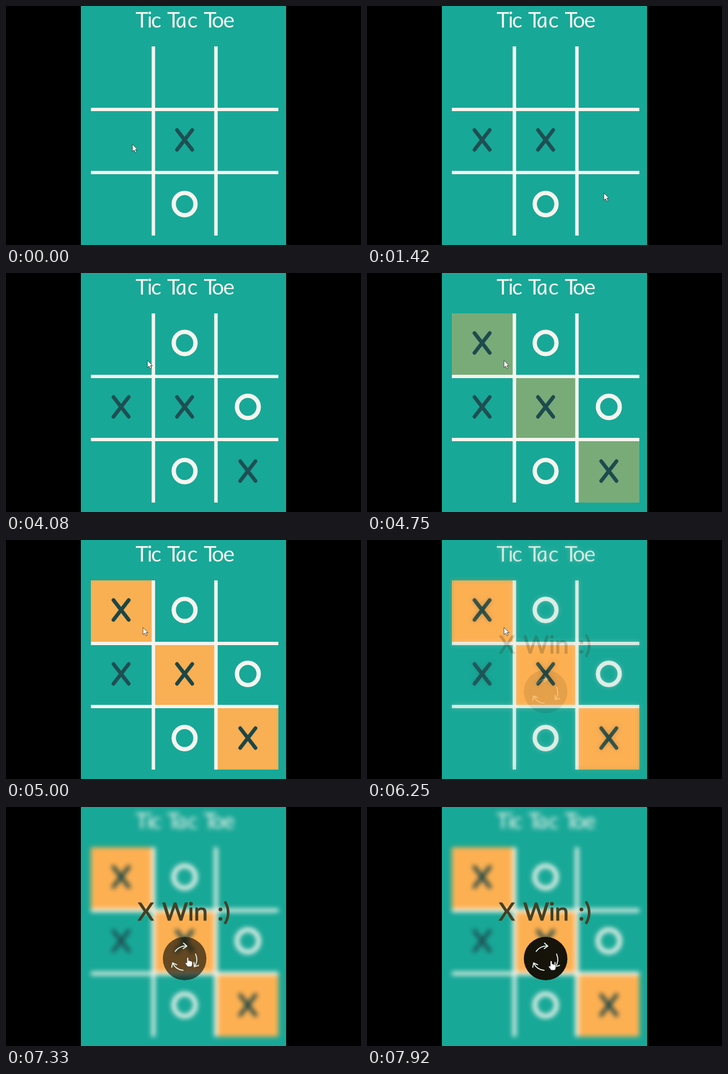
An HTML page for the animation above (8000 ms loop, 640 by 432 pixels).

```html
<!DOCTYPE html>
<html lang="en">
<head>
<meta charset="utf-8">
<title>Tic Tac Toe</title>
<style>
  html, body { margin: 0; width: 100%; height: 100%; overflow: hidden; background: #000; }
  svg { display: block; width: 640px; height: 432px; }
  text { font-family: Lato, sans-serif; }
  .title { font-size: 39px; fill: #f5f5ee; }
  .slant { font-style: italic; }
  .result { font-size: 45px; fill: #453f24; stroke: #453f24; stroke-width: 1.2; stroke-linejoin: round; }
  .x { fill: none; stroke: #1e4f53; stroke-width: 6.8; stroke-linecap: round; }
  .o { fill: none; stroke: #f5f5ee; stroke-width: 7.8; }
  .win { fill: #fdb052; }
  .icon { fill: none; stroke: #e6f3ea; stroke-width: 1.8; stroke-linecap: round; stroke-linejoin: round; }
  .arrow, .hand { fill: #fff; stroke: #2b2b2b; stroke-width: .8; stroke-linejoin: round; }
  .beam { fill: none; stroke: #35524f; stroke-width: 1.2; }
  #blurred { filter: blur(4px); }
</style>
</head>
<body>
<svg viewBox="0 0 640 432">
  <defs>
    <path id="cross" d="M-13.7-17.8 13.7 17.8M13.7-17.8-13.7 17.8"/>
    <ellipse id="ring" rx="19.6" ry="20.1"/>
    <path id="turn" d="M-17-13Q-9-24 4-22.5M-2-28 4-22.5-2.5-18"/>
    <clipPath id="panel"><rect x="135" width="370" height="432"/></clipPath>
  </defs>
  <g clip-path="url(#panel)">
    <g id="board">
      <rect x="115" y="-20" width="410" height="472" fill="#18a897"/>
      <g class="title">
        <text y="39" x="233.5 254.5 261.5">Tic</text>
        <text y="39" x="290.5">T</text>
        <text class="slant" transform="translate(307.5 39) skewX(8)">a</text>
        <text y="39" x="327">c</text>
        <text y="39" x="356.5 371 391.5">Toe</text>
      </g>
      <g id="cells"></g>
      <path d="M265.7 73V415M378.5 73V415M153 187H491M153 301H491" stroke="#f5f5ee" stroke-width="6.2"/>
      <g id="marks"></g>
    </g>
    <g id="modal">
      <use id="blurred" href="#board"/>
      <g class="result">
        <text x="237.5" y="205">X</text>
        <text x="281.5" y="205">Win</text>
        <text x="381" y="205">:)</text>
      </g>
      <circle id="disc" cx="322" cy="274" r="39.3" fill="#15130a"/>
      <g class="icon" transform="translate(322 274)">
        <use href="#turn"/>
        <use href="#turn" transform="rotate(120)"/>
        <use href="#turn" transform="rotate(240)"/>
      </g>
    </g>
  </g>
  <g id="cursor">
    <path class="arrow" d="M0 0V13L3 10.3 5.2 15 7.4 14 5.2 9.5H9Z"/>
    <path class="beam" d="M-3-6.5H-1Q0-6.5 0-5.5Q0-6.5 1-6.5H3M0-5.5V5.5M-3 6.5H-1Q0 6.5 0 5.5Q0 6.5 1 6.5H3"/>
    <path class="hand" d="M-1.5 1Q0-1 1.5 1V6Q3 5 4 6.5Q5.5 5.6 6.5 7.2Q8.5 7 8.5 9V12Q8 15 6.5 17H0L-4.5 11Q-4.5 8.5-1.5 10Z"/>
  </g>
</svg>
<script>
const LOOP = 8000;
const $ = id => document.getElementById(id);
const clamp = v => Math.min(1, Math.max(0, v));
const span = (t, from, to) => clamp((t - from) / (to - from));
const smooth = p => p * p * (3 - 2 * p);
const easeOut = p => 1 - (1 - p) ** 2.5;

function add(parent, tag, attrs) {
  const el = document.createElementNS("http://www.w3.org/2000/svg", tag);
  for (const key in attrs) el.setAttribute(key, attrs[key]);
  return parent.appendChild(el);
}

const colX = [207.5, 322, 436], rowY = [126.4, 242, 358];
// kind, column, row, time placed, part of the winning line
const moves = [
  ["x", 1, 1, 0, true], ["o", 1, 2, 0],
  ["x", 0, 1, 500], ["o", 2, 1, 1920],
  ["x", 2, 2, 2670, true], ["o", 1, 0, 3920],
  ["x", 0, 0, 4670, true]
].map(([kind, c, r, at, wins]) => ({
  at, wins,
  el: add($("marks"), "use", {
    href: kind === "x" ? "#cross" : "#ring", class: kind,
    transform: `translate(${colX[c]} ${rowY[r]})`
  })
}));

for (const [x, y, w, h] of [[153, 73, 110, 111], [268, 190, 108, 108], [381, 304, 110, 111]])
  add($("cells"), "rect", { x, y, width: w, height: h, class: "win" });

// time, x, y of the pointer
const path = [
  [520, 228, 250], [840, 421, 325], [1000, 421, 325], [1080, 418, 322],
  [1340, 418, 322], [1420, 427, 338], [2330, 418, 332], [2500, 418.5, 338],
  [3590, 418.5, 338], [4080, 255, 158], [4250, 247, 158],
  [6900, 247, 158], [7400, 332, 278]
];

function pointer(t) {
  const i = path.findIndex(p => p[0] > t);
  if (i === 0) return path[0].slice(1);
  if (i < 0) return path[path.length - 1].slice(1);
  const [t0, x0, y0] = path[i - 1], [t1, x1, y1] = path[i];
  const p = smooth(span(t, t0, t1));
  return [x0 + (x1 - x0) * p, y0 + (y1 - y0) * p];
}

const shapes = [...$("cursor").children];

function draw(t) {
  const won = easeOut(span(t, 4670, 5080));
  $("cells").style.opacity = won;
  for (const { el, at, wins } of moves) {
    el.style.visibility = t >= at ? "visible" : "hidden";
    if (wins) el.style.stroke = `rgb(${30 - 2 * won},${79 - 9 * won},${83 - 13 * won})`;
  }

  const shade = smooth(span(t, 6100, 6550));
  $("modal").style.opacity = shade;
  $("modal").style.display = shade ? "" : "none";
  $("disc").style.opacity = 0.38 + 0.62 * smooth(span(t, 7200, 7480));

  const [x, y] = pointer(t);
  $("cursor").setAttribute("transform", `translate(${x} ${y})`);
  const overButton = t > 6600 && Math.hypot(x - 322, y - 274) < 39.3;
  const shown = overButton ? 2 : t >= 2670 && t < 3620 ? 1 : 0;
  shapes.forEach((s, i) => s.style.display = i === shown ? "" : "none");
}

const start = performance.now();
function tick() {
  draw((performance.now() - start) % LOOP);
  requestAnimationFrame(tick);
}
tick();
</script>
</body>
</html>
```
